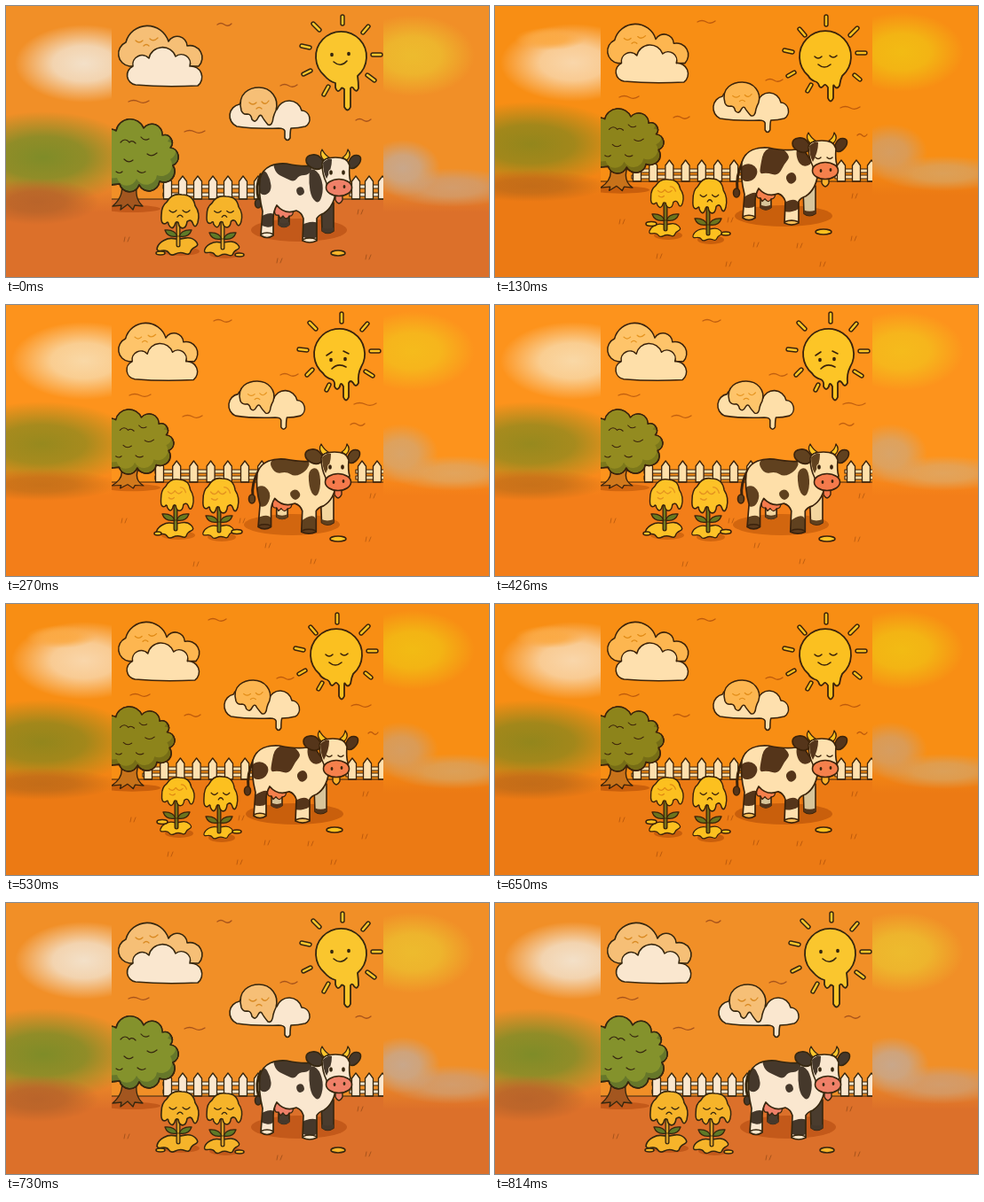
These frames come from a looping animation (544 px wide and 306 px high, 870 ms). An HTML page with a canvas:

```html
<!DOCTYPE html>
<html lang="en">
<head>
<meta charset="utf-8">
<title>Melting meadow</title>
<style>
html, body { margin: 0; height: 100%; overflow: hidden; background: #f18f26 }
canvas { display: block; width: 100vw; height: 100vh }
</style>
</head>
<body>
<canvas width="544" height="306"></canvas>
<script>
const c = document.querySelector('canvas').getContext('2d');
c.lineCap = c.lineJoin = 'round';

// Placements are [x, y, scaleX, scaleY].
const happy = {
  sky: '#f18f27', ground: '#dc702a', horizon: 218, ink: '#36270f', shade: '#c3591a', mark: '#a7531b',
  cream: '#fae7cf', tan: '#f6bf76', yellow: '#fac62e', petal: '#f6b42a', amber: '#d98a22',
  glows: [[88, 65, 78, 44, '#f3e0c8'], [42, 171, 108, 52, '#7f8c28'], [35, 221, 70, 26, '#b9642a'],
    [458, 56, 70, 46, '#edbb2e'], [502, 205, 75, 22, '#d39c6b'], [447, 183, 42, 32, '#c9a78a']],
  waves: [[238, 21, 16], [138, 108, 23], [309, 90, 19], [201, 142, 23], [394, 129, 17]],
  ticks: [[135, 264], [307, 288], [398, 233], [407, 284]],
  cloud: [128, 22, 1, 1], drift: [250, 92, 1, 1], scoop: [264, 92, 1, 1],
  sun: 'M359,79A28.5 28.5 0 1 1 396,79Q397,86 397,93Q395,98 392,94Q390,90 388,93V114Q385,121 381,114V94Q378,91 377,94Q373,99 371,92V87Q364,85 359,79Z',
  rays: 'M379,12V20M346,20l7,7M333,45l9,2M335,77l8,-4M358,100l5,-9M407,78l8,6M413,55h9M402,30l6,-7',
  eyes: [[367, 55], [386, 54]], face: 'M369,63Q377,70 384,62',
  tree: [119, 130, 1, 1], leaf: '#84922c', leafDark: '#66772a', bark: '#a3561f', trunk: [137, 205, 1, 1],
  fence: [182, 17, 394, 15], fenceTop: 192, fenceStart: 177,
  flowers: [[195, 213, 1, 1.05, 270, 21, 'sleep'], [245, 215, .94, .97, 273, 18, 'sleep']], stem: '#d9a02a', frond: '#5f7a28',
  drops: [[174, 279, 5, 2], [263, 281, 5, 2], [374, 279, 8, 3]],
  cow: [0, 0, 1, 1], head: [0, 0], coat: '#45382b', farLeg: '#4a3c2e', hoof: '#f6e5cb', pink: '#ef8068', tongue: '#ef8068',
  spots: ['300,176 322,174 346,178 342,191 330,191 325,199 314,194 304,189', '282,190 291,184 298,196 299,209 290,215 282,207',
    '342,182 353,188 358,206 353,224 344,217 341,200', '326,206 334,203 337,212 329,215', '330,246 354,242 354,263 330,262', '285,237 304,232 302,251 285,248'],
  look: 'open', tail: 'M287,190Q280,203 285,220', shadow: [330, 253, 54, 13]
};

const sleepy = {
  sky: '#f88e14', ground: '#ec7a14', horizon: 198, ink: '#3c230a', shade: '#c95f0c', mark: '#bd5a0c',
  cream: '#fee0ae', tan: '#fdb650', yellow: '#fbc020', petal: '#fcc01f', amber: '#e08a14',
  glows: [[88, 64, 82, 44, '#f9d6aa'], [62, 37, 40, 13, '#fbaa45'], [40, 156, 110, 48, '#93861c'], [40, 203, 85, 18, '#c36c18'],
    [458, 52, 70, 45, '#f2bb14'], [505, 189, 75, 20, '#dca058'], [445, 165, 42, 32, '#d69d60']],
  waves: [[228, 18, 20], [140, 103, 22], [305, 84, 19], [201, 126, 18], [389, 115, 22], [408, 146, 11]],
  ticks: [[142, 244], [184, 283], [262, 292], [293, 270], [342, 271], [404, 215], [403, 263], [368, 292], [264, 242]],
  cloud: [128, 20, .965, .97], drift: [244, 83, .94, 1], scoop: [258, 86, .97, .9],
  sun: 'M353,79A29 29 0 1 1 391,79Q389,83 388,90Q385,95 382,90Q381,88 381,92V104Q378,111 375,104V92Q372,87 370,90Q367,94 365,90Q364,86 360,85Q355,83 353,79Z',
  rays: 'M373,12V21M343,26l6,7M326,50l9,2M330,79l7,-4M352,96l4,-7M405,78l6,5M408,53h9M400,33l8,-8',
  eyes: [], face: 'M360,57q4,4 8,0M377,56q4,4 8,0M364,66Q371,72 378,66',
  tree: [119, 118, .945, .89], leaf: '#8d841b', leafDark: '#766d16', bark: '#c8721a', trunk: [137, 187, 1.05, .86],
  fence: [160, 18.2, 390, 17], fenceTop: 174, fenceStart: 154,
  flowers: [[193, 196, .87, .88, 252, 16, 'melt'], [241, 195, .9, 1.08, 257, 15, 'sleep']], stem: '#77701a', frond: '#6c741d',
  drops: [[176, 246, 6, 2.5], [260, 257, 5, 2], [370, 255, 9, 3]],
  cow: [-8, -14.1, 1, .978], head: [-3, -19], coat: '#55351a', farLeg: '#d8c59a', hoof: '#f8bd55', pink: '#f5804c', tongue: '#fbb12c',
  spots: ['303,161 322,159 333,170 326,178 319,192 306,188 298,190 299,180', '275,181 288,177 297,185 292,197 278,199',
    '339,160 354,165 358,178 347,182 340,174', '326,192 336,186 341,196 332,203', '323,222 340,217 345,230 324,234', '277,216 298,208 295,228 277,228'],
  look: 'shut', tail: 'M279,176Q271,192 273,208', shadow: [325, 237, 55, 12]
};

const sad = {
  sky: '#fd931c', ground: '#f37e19', horizon: 200, ink: '#3a220c', shade: '#d2660f', mark: '#c05f10',
  cream: '#fedfa9', tan: '#fec46a', yellow: '#fdc526', petal: '#fdc227', amber: '#e59420',
  glows: [[88, 63, 82, 44, '#f9d8a6'], [40, 157, 110, 48, '#97891e'], [40, 203, 85, 18, '#c87119'],
    [458, 52, 70, 45, '#f5bb1c'], [505, 190, 75, 20, '#e2a45c'], [445, 168, 42, 34, '#d9a468']],
  waves: [[234, 18, 20], [139, 102, 24], [309, 79, 20], [199, 126, 22], [392, 112, 25], [388, 135, 16]],
  ticks: [[132, 244], [213, 293], [294, 272], [345, 290], [407, 265], [265, 244], [412, 216]],
  cloud: [128, 20, .945, .95], drift: [249, 82, .95, .98], scoop: [263, 86, .95, .86],
  sun: 'M357,77A28.5 28.5 0 1 1 400,70Q396,78 397,88Q394,94 391,88Q388,84 386,88V104Q383,111 380,104V92Q377,86 376,92Q373,98 370,92Q371,86 367,84Q360,82 357,77Z',
  rays: 'M378,10V19M342,20l7,7M330,50l9,1M339,79l6,-6M361,96l3,-6M405,75l8,5M411,52h9M401,28l6,-7',
  eyes: [[366, 62], [382, 61]], face: 'M367,72Q374,65 383,70M361,57l6,-4M380,52l6,3',
  tree: [119, 120, .93, .89], leaf: '#938b20', leafDark: '#7c781b', bark: '#d2791c', trunk: [137, 189, 1.05, .72],
  fence: [173, 19.2, 401, 17], fenceTop: 176, fenceStart: 168,
  flowers: [[192, 197, .87, .98, 253, 19, 'melt'], [241, 196, .95, 1.08, 255, 16, 'melt']], stem: '#737a1e', frond: '#697a20',
  drops: [[171, 258, 4, 2], [260, 256, 6, 2.5], [374, 264, 9, 3]],
  cow: [-13.3, 6, 1.036, .944], head: [-1, -5], coat: '#60411f', farLeg: '#f3d69f', hoof: '#5b3a1c', pink: '#f57a4c', tongue: '#f57a4c',
  spots: ['295,175 318,170 344,175 338,188 325,194 316,188 303,191', '280,206 291,203 299,214 293,229 281,226',
    '340,186 352,183 355,203 350,218 342,210', '318,212 327,207 333,215 325,222', '327,246 350,234 350,262 327,262', '280,240 300,236 298,256 280,256'],
  look: 'open', tail: 'M285,186Q276,202 278,216', shadow: [322, 248, 54, 12]
};

let p;

function paint(d, fill, stroke = p.ink, width = 1.6) {
  const path = new Path2D(d);
  if (fill) { c.fillStyle = fill; c.fill(path); }
  if (stroke) { c.strokeStyle = stroke; c.lineWidth = width; c.stroke(path); }
}

function oval(x, y, rx, ry, fill, stroke) {
  paint(`M${x - rx},${y}a${rx} ${ry} 0 1 1 ${2 * rx},0a${rx} ${ry} 0 1 1 ${-2 * rx},0Z`, fill, stroke);
}

function at([x, y, sx = 1, sy = 1], draw) {
  c.save();
  c.translate(x, y);
  c.scale(sx, sy);
  draw();
  c.restore();
}

const points = text => text.split(' ').map(pair => pair.split(',').map(Number));

// Outline of round bumps between neighbouring points.
function bumps(text) {
  const list = points(text);
  return 'M' + list.map(([x, y], i) => {
    if (!i) return [x, y];
    const r = .52 * Math.hypot(x - list[i - 1][0], y - list[i - 1][1]);
    return `A${r} ${r} 0 0 1 ${x},${y}`;
  }).join('');
}

function soft(text) {
  const list = points(text), n = list.length;
  const mid = i => [0, 1].map(k => (list[i % n][k] + list[(i + 1) % n][k]) / 2);
  return 'M' + mid(n - 1) + list.map((q, i) => `Q${q} ${mid(i)}`).join('') + 'Z';
}

function glow([x, y, rx, ry, color]) {
  at([x, y, rx, ry], () => {
    const g = c.createRadialGradient(0, 0, 0, 0, 0, 1);
    g.addColorStop(0, color);
    g.addColorStop(.45, color + 'd8');
    g.addColorStop(1, color + '00');
    c.fillStyle = g;
    c.fillRect(-1, -1, 2, 2);
  });
}

function backdrop() {
  const g = c.createLinearGradient(0, 0, 0, 306);
  g.addColorStop(0, p.sky);
  g.addColorStop((p.horizon - 25) / 306, p.sky);
  g.addColorStop((p.horizon + 15) / 306, p.ground);
  c.fillStyle = g;
  c.fillRect(0, 0, 544, 306);
  p.glows.forEach(glow);
  c.fillStyle = p.sky;
  c.fillRect(119, 0, 306, 306);
  c.fillStyle = p.ground;
  c.fillRect(119, p.horizon, 306, 306);
  for (const [x, y, w] of p.waves) paint(`M${x},${y}q${w / 4},-3 ${w / 2},0t${w / 2},-1`, null, p.mark, 1.3);
  for (const [x, y] of p.ticks) paint(`M${x - 2},${y + 2}l1,-5M${x + 2},${y + 2}l2,-5`, null, p.mark, 1);
}

function clouds() {
  at(p.cloud, () => {
    paint(bumps('11,46 7,19 55,18 76,23 89,46') + 'Z', p.tan);
    paint('M18,17q4,4 8,0M34,15q4,4 9,-1M27,23q3,-3 6,0', null, p.amber, 1.3);
    paint(bumps('18,67 15,46 33,37 63,35 79,46 88,68') + 'Q50,70 18,67Z', p.cream);
  });
  at(p.drift, () => paint(bumps('10,44 13,19 31,21 55,25 83,26 87,44') +
    'Q79,46 71,46Q70,49 70,57Q67,62 64,57V49Q63,46 57,46Q30,47 10,44Z', p.cream));
  at(p.scoop, () => {
    paint('M1,26C-4,6 11,0 21,0C34,0 44,12 40,26Q38,30 37,34Q36,44 31,42Q26,36 24,32Q22,30 20,34Q17,41 13,36Q12,30 8,30Q3,31 1,26Z', p.tan);
    paint('M10,17q4,4 8,0M24,16q4,5 8,-1M18,24q3,-3 6,0', null, p.amber, 1.3);
  });
}

function sun() {
  paint(p.rays, null, p.ink, 5.4);
  paint(p.rays, null, p.yellow, 2.5);
  paint(p.sun, p.yellow, p.ink, 1.8);
  for (const [x, y] of p.eyes) oval(x, y, 1.9, 2.3, p.ink, null);
  paint(p.face, null, p.ink, 1.6);
}

function fence() {
  const { fenceTop: top, horizon: base, fence: [left, step, right, gap] } = p;
  for (const [from, to] of [[p.fenceStart, 292], [right - 7, 426]])
    for (const y of [top + 10, base - 7]) paint(`M${from},${y}H${to}v4H${from}Z`, p.cream, p.ink, 1.1);
  const picket = x => paint(`M${x - 4.5},${base}V${top + 6}l4.5,-6l4.5,6V${base}Z`, p.cream, p.ink, 1.3);
  for (let x = left; x < 290; x += step) picket(x);
  for (let x = right; x < 430; x += gap) picket(x);
  paint(`M119,${base}H425`, null, p.ink, 1);
}

function tree() {
  const [x, y, sx, sy] = p.trunk;
  oval(x + 5, y + 24 * sy, 32, 4, p.shade, null);
  at([x, y, sx, sy], () => paint('M-7,-4Q-4,10 -17,21L-7,20L-8,25L0,19L6,25L8,20L17,21Q7,12 11,-4Z', p.bark, p.ink, 1.4));
  at(p.tree, () => {
    const crown = bumps('-11,73 -7,20 5,11 36,8 57,16 66,30 69,50 54,68 31,72 9,71') + 'Z';
    paint(crown, p.leafDark);
    c.save();
    c.clip(new Path2D(crown));
    at([-3, -7], () => paint(crown, p.leaf, null));
    c.restore();
    paint(crown);
    paint('M10,24q5,-6 10,0q3,-3 7,1M33,18q4,5 9,2M14,43q5,5 10,1M40,37q5,4 11,-1M29,56q4,4 9,1M5,57q4,3 7,0', null, p.ink, 1.2);
  });
}

function cow() {
  oval(...p.shadow, p.shade, null);
  paint(p.tail, null, p.ink, 3);
  const [tx, ty] = p.tail.match(/(\d+),(\d+)$/).slice(1).map(Number);
  oval(tx - 1, ty + 3, 3.5, 5, p.coat);
  c.save();
  at(p.cow, () => {
    paint('M307,225V247Q313,252 319,247V225ZM355,225L356,254Q362,259 369,254V222Z', p.farLeg);
    paint('M307,244Q313,247 319,244V248Q313,252 307,248ZM356,250Q362,253 369,250V254Q362,259 356,254Z', p.coat, null);
    paint('M303,226Q301,238 307,236L309,240L312,237Q316,243 319,237Q324,238 324,228Z', p.pink, p.ink, 1.3);
  });
  const body = new Path2D();
  const [x, y, sx, sy] = p.cow;
  body.addPath(new Path2D('M286,195C290,180 304,177 316,178C330,181 344,182 354,178L372,205C371,218 367,228 358,234Q352,236 350,240V265Q342,269 334,265L335,240Q333,233 327,231Q314,236 305,225Q301,232 301,240V259Q294,264 287,259L289,232Q284,212 286,195Z'),
    new DOMMatrix([sx, 0, 0, sy, x, y]));
  c.fillStyle = p.cream;
  c.fill(body);
  c.clip(body);
  for (const s of p.spots) paint(soft(s), p.coat, null);
  at(p.cow, () => {
    oval(342, 267, 10, 5, p.hoof);
    oval(294, 261, 9, 5, p.hoof);
  });
  c.restore();
  c.lineWidth = 1.7;
  c.strokeStyle = p.ink;
  c.stroke(body);
  at(p.head, head);
}

function head() {
  paint(soft('360,180 352,167 338,169 338,179 350,186'), p.coat);
  paint(soft('384,180 390,168 400,169 399,178 390,185'), p.coat);
  paint('M358,174Q352,168 356,162Q359,168 364,171ZM379,171Q384,168 385,162Q390,168 384,174Z', p.yellow, p.ink, 1.3);
  paint('M356,178Q357,171 371,171Q385,171 387,180Q386,192 388,198Q385,212 374,213Q362,212 361,200Q356,190 356,178Z', p.cream);
  paint('M357,177Q363,171 367,173Q367,184 361,195Q357,188 357,177Z', p.coat, null);
  paint('M371,211V219Q375,227 379,219V211Z', p.tongue, p.ink, 1.4);
  oval(375, 205, 14.5, 9.5, p.pink);
  oval(370, 205, 1.4, 1.9, p.ink, null);
  oval(381, 204, 1.4, 1.9, p.ink, null);
  if (p.look === 'shut') paint('M364,190q3,3 6,0M377,190q3,3 6,0', null, p.ink, 1.5);
  else for (const x of [366, 380]) {
    oval(x, 188, 2.8, 3.6, p.cream, null);
    oval(x, 188, 1.9, 2.7, p.ink, null);
  }
}

function flower([x, top, sx, sy, base, r, mood]) {
  oval(x + 2, base + 7, r, 5, p.shade, null);
  at([x - 1, base, r / 20, r / 20], () =>
    paint(soft('-21,-2 -10,-8 0,-6 14,-9 23,0 14,4 12,11 2,7 -8,12 -12,5 -24,7'), p.petal));
  const bottom = top + 28 * sy, y = base - 13;
  paint(`M${x - 1},${bottom}V${base}`, null, p.ink, 5);
  paint(`M${x - 1},${bottom}V${base}`, null, p.stem, 2.4);
  for (const side of [-1, 1]) at([x - 1, y, side, 1], () => paint('M1,3Q4,-5 15,-4Q12,5 1,3Z', p.frond, p.ink, 1.3));
  at([x, top, sx, sy], () => {
    paint('M-20,22Q-20,12 -14,8Q-8,-2 3,0Q16,0 18,12Q24,20 21,30Q18,38 15,30Q13,26 9,29Q8,36 4,36Q0,36 -1,30Q-4,28 -5,33Q-8,39 -12,32Q-12,28 -15,31Q-21,33 -20,22Z', p.petal);
    if (mood === 'sleep') paint('M-11,17q4,4 8,0M4,17q4,4 8,0M-2,24q3,-4 6,0', null, p.ink, 1.3);
    else paint('M-11,14q5,5 9,-1q4,6 9,1M5,9q5,0 7,6M-10,21q4,3 7,0', null, p.amber, 1.4);
  });
}

function frame() {
  const t = performance.now() % 870;
  p = t < 130 || t >= 730 ? happy : t < 270 || t >= 530 ? sleepy : sad;
  backdrop();
  c.save();
  c.beginPath();
  c.rect(119, 0, 306, 306);
  c.clip();
  clouds();
  sun();
  fence();
  tree();
  cow();
  p.flowers.forEach(flower);
  for (const d of p.drops) oval(...d, p.petal);
  c.restore();
  requestAnimationFrame(frame);
}
frame();
</script>
</body>
</html>
```
